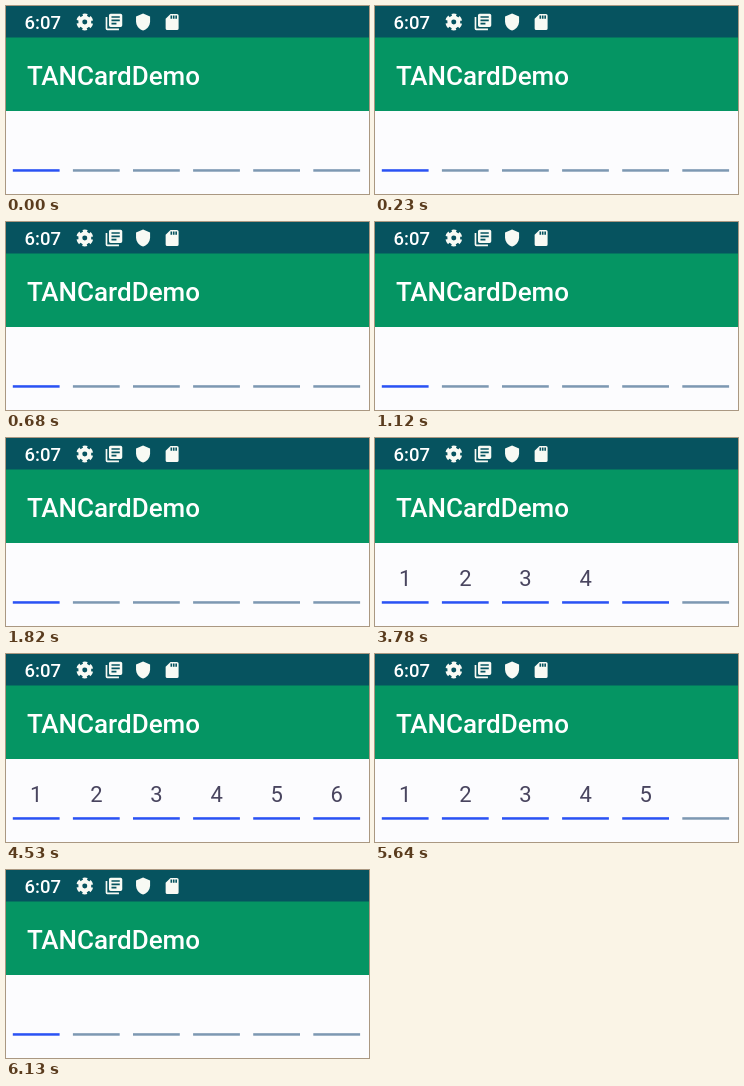
Write an HTML page that moves like this. It is 363 px wide and 188 px high and loops after 7250 ms.

```html
<!DOCTYPE html>
<html lang="en">
<head>
<meta charset="utf-8">
<title>Code entry</title>
<style>
  html, body { margin: 0; width: 100%; height: 100%; overflow: hidden; background: #fcfcfe; }
  svg { display: block; font-family: Roboto, sans-serif; }
  .bar { fill: #fff; font-weight: 500; }
  .icons { fill: #f8faf4; }
  .digit { fill: #49455f; font-size: 22px; text-anchor: middle; }
</style>
</head>
<body>
<svg id="stage" width="363" height="188" viewBox="0 0 363 188">
  <rect width="363" height="32" fill="#06535f"/>
  <rect y="31.5" width="363" height="73.5" fill="#059563"/>
  <g class="bar">
    <text x="18.5" y="22.5" font-size="18.5">6:07</text>
    <text x="21" y="78.5" font-size="26">TANCardDemo</text>
  </g>
  <g class="icons">
    <g transform="translate(78.8 16) scale(.86)" fill="none" stroke="#f8faf4">
      <circle r="5.2" stroke-width="4.6"/>
      <circle r="8" stroke-width="3.6" stroke-dasharray="5 3.378" stroke-dashoffset="-1.69"/>
    </g>
    <path transform="translate(98 6) scale(.83)" fill-rule="evenodd" d="M4 6H2v14a2 2 0 0 0 2 2h14v-2H4zM20 2H8a2 2 0 0 0-2 2v12a2 2 0 0 0 2 2h12a2 2 0 0 0 2-2V4a2 2 0 0 0-2-2zm-1 9H9V9h10zm-4 4H9v-2h6zm4-8H9V5h10z"/>
    <path transform="translate(127.7 6.6) scale(.78)" d="M12 1L3 5v6c0 5.55 3.84 10.74 9 12 5.16-1.26 9-6.45 9-12V5z"/>
    <path transform="translate(156.4 6.3) scale(.81)" fill-rule="evenodd" d="M18 2h-8L4 8v12a2 2 0 0 0 2 2h12a2 2 0 0 0 2-2V4a2 2 0 0 0-2-2zm-6 6h-2V4h2zm3 0h-2V4h2zm3 0h-2V4h2z"/>
  </g>
</svg>
<script>
const LOOP = 7250, CELLS = 6;
const TYPED = [2710, 3060, 3330, 3780, 4130, 4530];
const LAST_ERASED = 5110, ERASE_START = 5640, ERASE_STEP = 490 / 9;
const stage = document.getElementById('stage');

function add(tag, attrs) {
  const el = document.createElementNS('http://www.w3.org/2000/svg', tag);
  for (const key in attrs) el.setAttribute(key, attrs[key]);
  return stage.appendChild(el);
}

const cells = Array.from({ length: CELLS }, (_, i) => {
  const x = 6.8 + 60.1 * i;
  const line = add('rect', { x, y: 163.2, width: 46.8, height: 2.5 });
  const digit = add('text', { class: 'digit', x: x + 23.5, y: 147.7 });
  digit.textContent = i + 1;
  return { line, digit };
});

// Number of digits shown and of underlines lit
function stateAt(t) {
  if (t < LAST_ERASED) {
    const digits = TYPED.filter(at => t >= at).length;
    return { digits, lit: Math.min(digits + 1, CELLS) };
  }
  if (t < ERASE_START) return { digits: 5, lit: 6 };
  // Erasing alternates: move focus back, then clear a digit
  const step = Math.min(9, Math.floor((t - ERASE_START) / ERASE_STEP + 1e-6));
  return { digits: 5 - Math.ceil(step / 2), lit: 5 - Math.floor(step / 2) };
}

function draw(now) {
  const { digits, lit } = stateAt(now % LOOP);
  cells.forEach(({ line, digit }, i) => {
    line.setAttribute('fill', i < lit ? '#2a52f4' : '#7d98b2');
    digit.setAttribute('visibility', i < digits ? 'visible' : 'hidden');
  });
}

let start;
function tick(now) {
  start ??= now;
  draw(now - start);
  requestAnimationFrame(tick);
}
draw(0);
requestAnimationFrame(tick);
</script>
</body>
</html>
```
